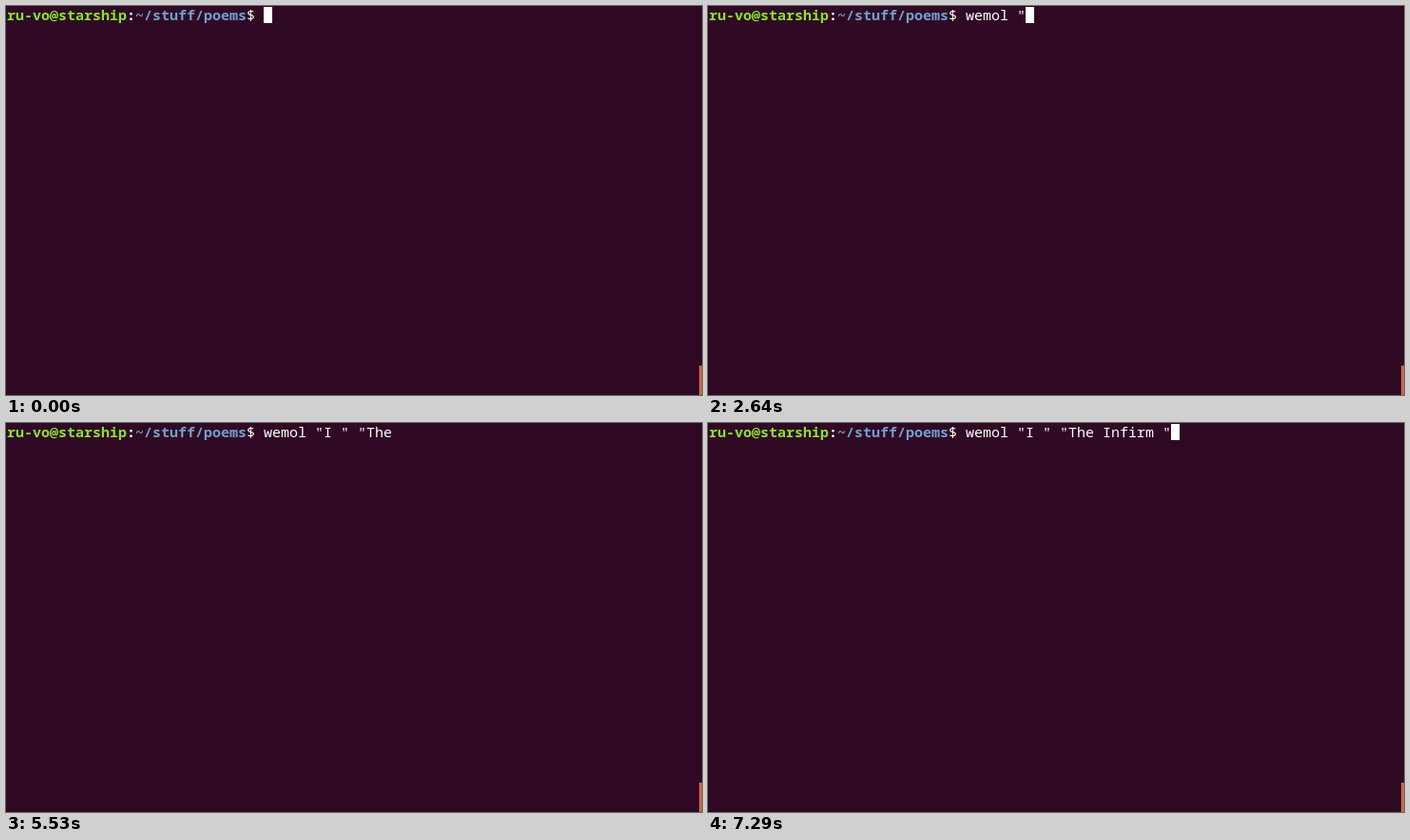
Recreate the animation shown at these times as an HTML page with a canvas. Size 732x410 px, loop 8000 ms.

```html
<!DOCTYPE html>
<html lang="en">
<head>
<meta charset="utf-8">
<title>Terminal typing</title>
<style>
  html, body { margin: 0; width: 100%; height: 100%; overflow: hidden; background: #300a24; }
  canvas { display: block; }
</style>
</head>
<body>
<canvas id="stage" width="732" height="410"></canvas>
<script>
const ctx = document.getElementById('stage').getContext('2d');
const LOOP = 8000;
const CELL = 9;
const LEFT = 1;
const BASELINE = 15;
const FONT = '15px "Noto Sans Mono", "DejaVu Sans Mono", monospace';
const WHITE = '#ffffff';

const prompt = [
  ['ru-vo@starship', '#8ae234', 700],
  [':', WHITE, 700],
  ['~/stuff/poems', '#729fcf', 700],
  ['$ ', WHITE, 500]
];
const command = 'wemol "I " "The Infirm "';

// Time at which each character of the command is typed
const keys = [
  500, 730, 930, 1210, 1360, 1610, 2640, 3310, 3600, 4000, 4300, 4580,
  4980, 5180, 5320, 5530, 6170, 6390, 6510, 6650, 6750, 6850, 7050, 7290
];
const cursorOff = 3600;
const cursorOn = 6390;

function rect(color, x, y, w, h) {
  ctx.fillStyle = color;
  ctx.fillRect(x, y, w, h);
}

// Draws text at a column and returns the column after it
function write(text, col, color, weight) {
  ctx.font = weight + ' ' + FONT;
  ctx.fillStyle = color;
  ctx.fillText(text, LEFT + col * CELL, BASELINE);
  return col + text.length;
}

function draw(t) {
  rect('#300a24', 0, 0, 732, 410);
  rect('#2c0921', 0, 407, 732, 3);
  rect('#c9664a', 729, 379, 3, 31);

  let col = 0;
  for (const [text, color, weight] of prompt) col = write(text, col, color, weight);

  const typed = keys.filter(k => k <= t).length;
  col = write(command.slice(0, typed), col, WHITE, 500);
  if (t < cursorOff || t >= cursorOn) rect(WHITE, LEFT + col * CELL, 1, CELL, 17);
}

const start = performance.now();
function tick() {
  draw((performance.now() - start) % LOOP);
  requestAnimationFrame(tick);
}
tick();
</script>
</body>
</html>
```
